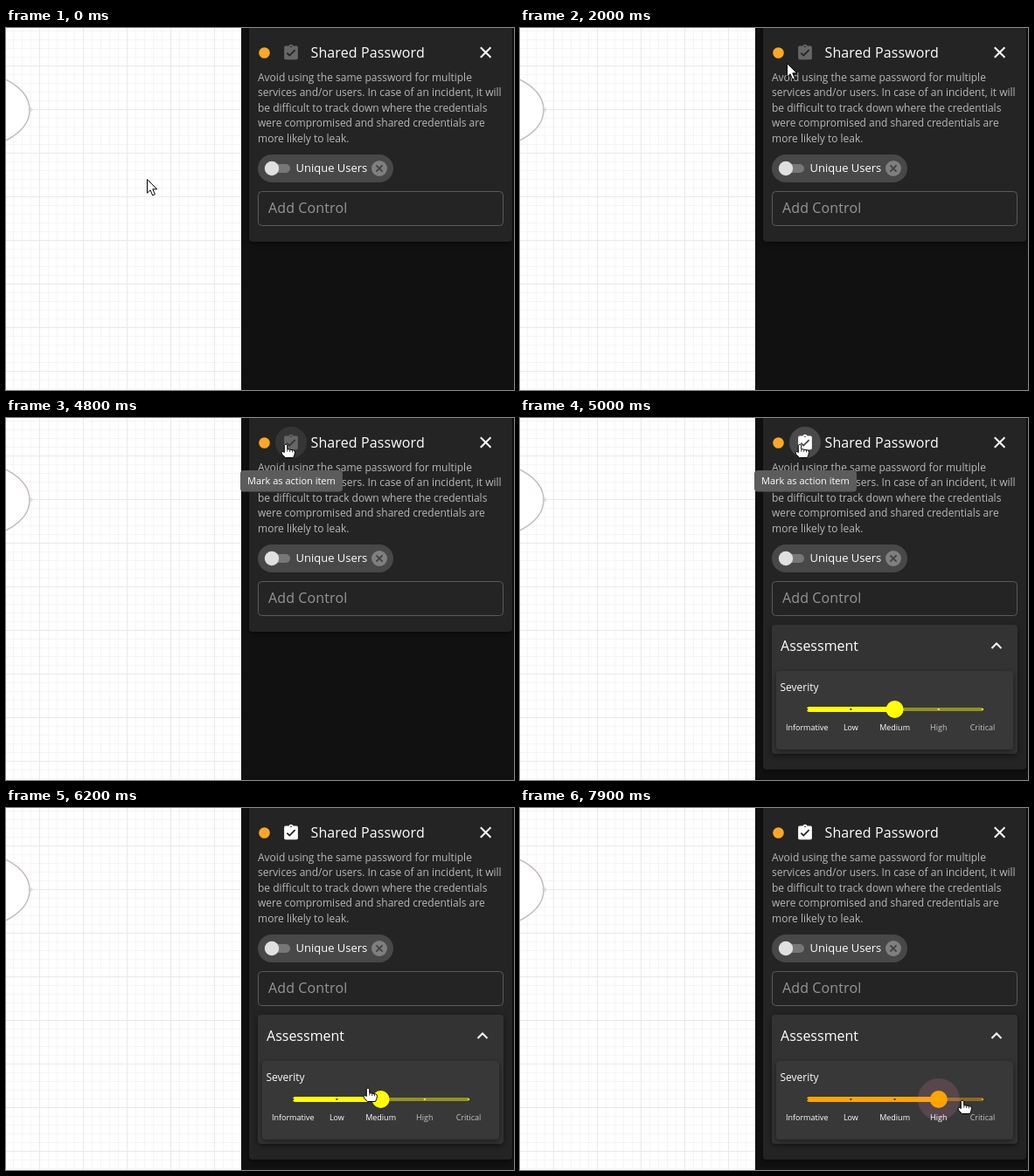
These frames come from a looping animation (581 by 415 pixels, 8000 ms). An HTML page:

```html
<!DOCTYPE html>
<html lang="en">
<head>
<meta charset="utf-8">
<title>Severity slider</title>
<style>
  html, body { margin: 0; width: 100%; height: 100%; overflow: hidden; background: #111; }
  svg { display: block; width: 581px; height: 415px; font-family: "Open Sans", "Noto Sans", sans-serif; }
  .paper { filter: drop-shadow(0 2px 3px rgba(0, 0, 0, .45)); }
  .cursor { fill: #fff; stroke: #000; stroke-width: 1; stroke-linejoin: round; }
</style>
</head>
<body>
<svg viewBox="0 0 581 415">
  <defs>
    <pattern id="minor" x="8" y="3" width="10" height="10" patternUnits="userSpaceOnUse">
      <path d="M.5 0V10M0 .5H10" stroke="#f5f5f5"/>
    </pattern>
    <pattern id="major" x="38" y="43" width="50" height="50" patternUnits="userSpaceOnUse">
      <path d="M.5 0V50M0 .5H50" stroke="#e9e9e9"/>
    </pattern>
  </defs>

  <rect width="269" height="415" fill="#fff"/>
  <rect width="269" height="415" fill="url(#minor)"/>
  <rect width="269" height="415" fill="url(#major)"/>
  <ellipse cx="-43" cy="94" rx="70" ry="44" fill="#fff" stroke="#c3b9b9" stroke-width="1.4"/>
  <circle cx="28" cy="93.5" r="2.5" fill="#ccc" opacity=".5"/>

  <rect x="269" width="312" height="415" fill="#111"/>
  <rect id="card" class="paper" x="278" y="-6" width="301" height="251" rx="4" fill="#242424"/>

  <circle cx="295.5" cy="28.5" r="6.3" fill="#ffa726"/>
  <circle id="hover" cx="326" cy="28" r="18" fill="#fff" opacity=".08"/>
  <circle id="ripple" cx="326" cy="28" fill="#fff"/>
  <path id="clipboard" transform="translate(315.5 17.8) scale(.875)" d="M19 3h-4.18C14.4 1.84 13.3 1 12 1s-2.4.84-2.82 2H5c-1.1 0-2 .9-2 2v14c0 1.1.9 2 2 2h14c1.1 0 2-.9 2-2V5c0-1.1-.9-2-2-2zm-7 0c.55 0 1 .45 1 1s-.45 1-1 1-1-.45-1-1 .45-1 1-1zm-2 14l-4-4 1.41-1.41L10 14.17l6.59-6.59L18 9l-8 8z"/>
  <text x="348.5" y="34" font-size="16" letter-spacing=".0075em" fill="#fff">Shared Password</text>
  <path d="M542.8 22.2l11.6 11.6M554.4 22.2l-11.6 11.6" stroke="#fff" stroke-width="2"/>

  <g id="description" font-size="12" fill="#b8b8b8"></g>

  <rect x="288" y="145" width="155" height="32" rx="16" fill="#484848"/>
  <rect x="297" y="156" width="28" height="10" rx="5" fill="#777"/>
  <circle cx="304" cy="161" r="8.2" fill="#e0e0e0"/>
  <text x="331.5" y="165" font-size="13" fill="#fff">Unique Users</text>
  <circle cx="427" cy="161" r="9" fill="#7f7f7f"/>
  <path d="M423.4 157.4l7.2 7.2M430.6 157.4l-7.2 7.2" stroke="#404040" stroke-width="1.7"/>

  <rect x="288.5" y="187.5" width="280" height="39" rx="4" fill="none" stroke="#5a5a5a"/>
  <text x="300" y="212" font-size="16" letter-spacing=".0075em" fill="#969696">Add Control</text>

  <g id="assessment">
    <rect class="paper" x="288" y="237" width="281" height="148" rx="4" fill="#333"/>
    <text x="298" y="267" font-size="16" fill="#fff">Assessment</text>
    <path d="M539.5 264l5.5-5.5 5.5 5.5" fill="none" stroke="#fff" stroke-width="2"/>
    <rect class="paper" x="293" y="290" width="271" height="90" rx="4" fill="#383838"/>
    <text x="297.5" y="313" font-size="12" fill="#fff">Severity</text>
    <g id="slider">
      <rect x="328" y="332" width="202" height="4" rx="2" opacity=".45"/>
      <rect id="track" x="328" y="331" height="6" rx="3"/>
      <g id="marks"></g>
      <circle id="halo" cy="334" fill="#f48fb1" opacity=".16"/>
      <circle id="thumb" cy="334" r="10"/>
    </g>
    <g id="labels" font-size="9" text-anchor="middle" fill="#fff"></g>
  </g>

  <g id="tooltip">
    <rect x="268" y="60" width="117" height="24.5" rx="4" fill="#5c5c5c"/>
    <text x="276" y="76" font-size="11" fill="#fff">Mark as action item</text>
  </g>

  <path id="arrow" class="cursor" d="M.5 .5V16.2L4.1 12.8L6.7 18.9L9.4 17.7L6.8 11.8H11.7Z"/>
  <g id="hand" class="cursor">
    <path d="M-1.7 1.2Q0-1.4 1.7 1.2V5.6L8.6 6.8Q10.7 7.4 10.5 9.6L9.9 12.2L8.6 15.5H-.6L-4.2 11.6Q-5.4 9.4-4.4 8.6Q-3.2 7.8-1.7 9.6Z"/>
    <path d="M1.8 6V8.6M4.7 6.5V9M7.5 7V9.3" fill="none" stroke-width=".8"/>
  </g>
</svg>
<script>
const DURATION = 8000, STEP = 100;
const $ = id => document.getElementById(id);
const set = (id, attrs) => {
  for (const name in attrs) $(id).setAttribute(name, attrs[name]);
};
const add = (parent, tag, attrs, text = '') => {
  const node = document.createElementNS('http://www.w3.org/2000/svg', tag);
  for (const name in attrs) node.setAttribute(name, attrs[name]);
  node.textContent = text;
  return $(parent).appendChild(node);
};
const show = (id, on) => set(id, { visibility: on ? 'visible' : 'hidden' });

// Linear interpolation over [time, ...values] keys.
function at(keys, t) {
  const next = keys.findIndex(key => key[0] > t);
  if (next === 0) return keys[0].slice(1);
  if (next < 0) return keys[keys.length - 1].slice(1);
  const a = keys[next - 1], b = keys[next];
  const k = (t - a[0]) / (b[0] - a[0]);
  return a.slice(1).map((v, i) => v + (b[i + 1] - v) * k);
}

const pointerPath = [
  [1000, 161, 173], [1300, 185, 150], [1600, 245, 90], [1900, 290, 50],
  [2000, 305, 40], [2200, 320, 30], [5100, 320, 30], [5200, 328, 62],
  [5400, 385, 210], [5600, 412, 306], [6000, 414, 320], [6100, 414, 320],
  [6200, 414, 321], [6400, 433, 334], [7300, 433, 334], [7500, 447, 334],
  [7800, 491, 335], [7900, 506, 335]
];
const tooltipFade = [[2100, 0], [2400, 1], [5200, 1], [5400, 0]];
const rippleKeys = [[4800, 0, .1], [5000, 18, .1], [5100, 18, .1], [5400, 18, 0]];
const haloSize = [[6200, 10], [6400, 18], [6900, 18], [7100, 24]];
const OPEN_AT = 4900, SNAP_AT = 7600;

const stopX = i => 328.2 + 50.2 * i;

[
  'Avoid using the same password for multiple',
  'services and/or users. In case of an incident, it will',
  'be difficult to track down where the credentials',
  'were compromised and shared credentials are',
  'more likely to leak.'
].forEach((line, i) => add('description', 'text', { x: 288, y: 60.5 + 17.5 * i }, line));

const stops = ['Informative', 'Low', 'Medium', 'High', 'Critical'].map((name, i) => ({
  mark: add('marks', 'rect', { x: stopX(i) - 1, y: 333, width: 2, height: 2 }),
  label: add('labels', 'text', { x: stopX(i), y: 358 }, name)
}));

function render(t) {
  const open = t >= OPEN_AT;
  const [x, y] = at(pointerPath, t);

  const overIcon = Math.hypot(x - 326, y - 28) < 18;
  const overHeader = open && x > 288 && y > 237 && y < 285;
  const overSlider = open && x > 318 && y > 316 && y < 350;
  const pointing = overIcon || overHeader || overSlider;
  show('arrow', !pointing);
  show('hand', pointing);
  const transform = `translate(${x} ${y})`;
  set('arrow', { transform });
  set('hand', { transform });

  show('hover', overIcon);
  const [r, opacity] = at(rippleKeys, t);
  set('ripple', { r, opacity });
  set('clipboard', { fill: open ? '#fff' : '#666' });
  set('tooltip', { opacity: at(tooltipFade, t)[0] });

  show('assessment', open);
  set('card', { height: open ? 409 : 251 });

  const value = t >= SNAP_AT ? 3 : 2;
  const cx = stopX(value);
  set('slider', { fill: value === 3 ? '#ffa500' : '#ff0' });
  set('track', { width: cx - 328 });
  set('thumb', { cx });
  set('halo', { cx, r: at(haloSize, t)[0] });
  stops.forEach(({ mark, label }, i) => {
    if (i <= value) mark.setAttribute('fill', '#383838');
    else mark.removeAttribute('fill');
    label.setAttribute('opacity', i <= value ? 1 : .7);
  });
}

let start;
function tick(now) {
  start ??= now;
  const t = (now - start) % DURATION;
  render(Math.floor(t / STEP) * STEP);
  requestAnimationFrame(tick);
}
render(0);
requestAnimationFrame(tick);
</script>
</body>
</html>
```
